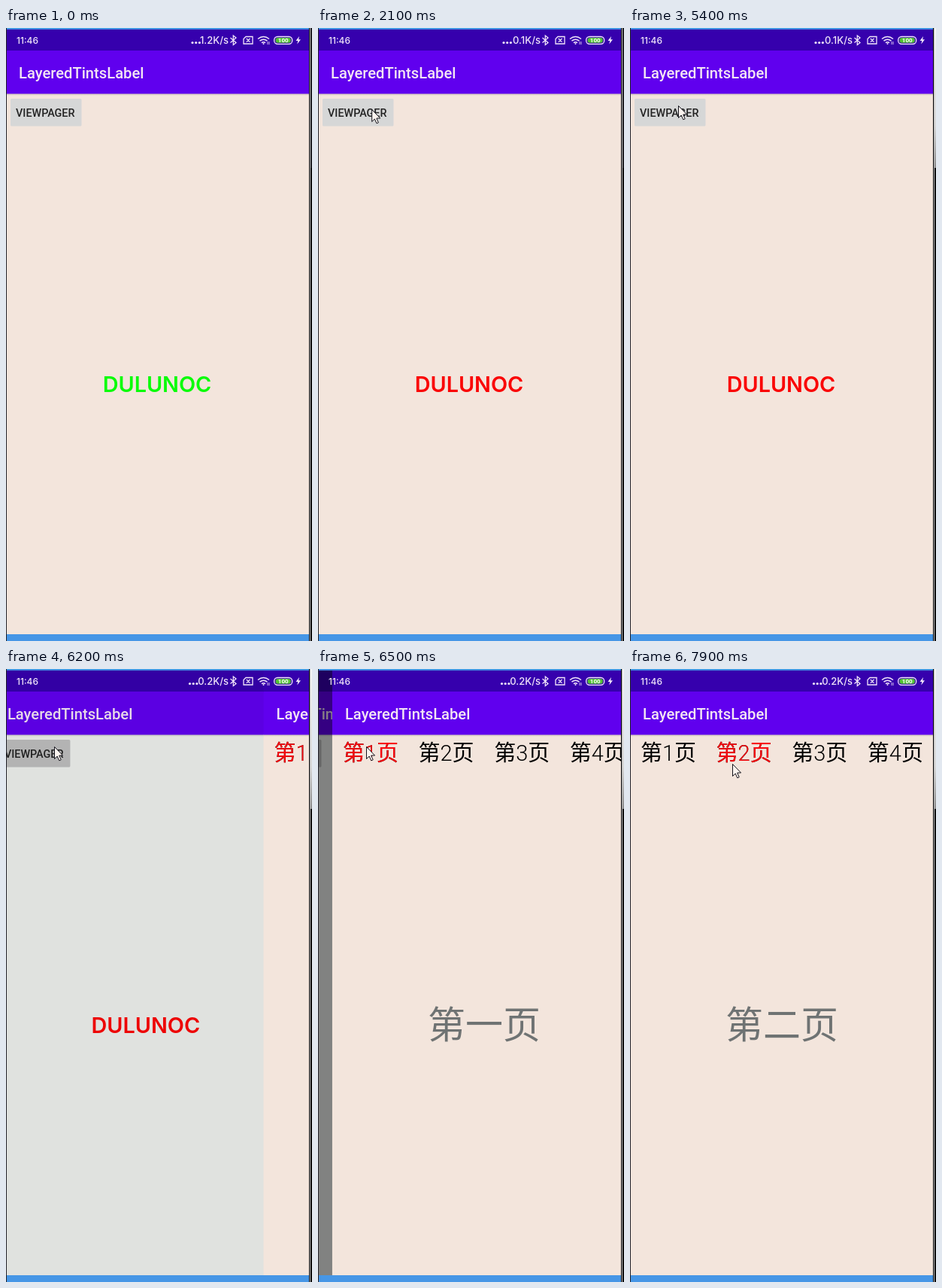
These frames come from a looping animation (407 px wide and 815 px high, 8 s). An HTML page:

```html
<!DOCTYPE html>
<html lang="zh-CN">
<head>
<meta charset="utf-8">
<style>
  html, body { margin: 0; width: 100%; height: 100%; overflow: hidden; background: #000; }
  svg { display: block; width: 100vw; height: 100vh; }
  text { white-space: pre; }
  .title { font: 500 20.2px Roboto, sans-serif; fill: #f3e5f4; }
  .button { font: 500 14.4px Roboto, sans-serif; fill: #222; }
  .status { font: 500 12px Inter, sans-serif; fill: #f1e6fa; }
  #speed { font-size: 13px; }
  .word { font: 600 28.8px Inter, sans-serif; text-anchor: middle; }
  .tab { font: 300 29px Roboto, 'Noto Sans CJK SC', 'Noto Sans CJK', sans-serif; }
  .page { font: 300 50px 'Noto Sans CJK SC', 'Noto Sans CJK', sans-serif; fill: #6f7373; text-anchor: middle; }
</style>
</head>
<body>
<svg viewBox="0 0 407 815" preserveAspectRatio="none">
  <defs>
    <linearGradient id="edge" x1="0" y1="0" x2="0" y2="1">
      <stop offset="0" stop-color="#f4f4f4"/><stop offset=".7" stop-color="#d8d8d8"/><stop offset="1" stop-color="#8c8c8c"/>
    </linearGradient>
    <linearGradient id="shade" x1="0" y1="0" x2="0" y2="1">
      <stop offset="0" stop-color="#000" stop-opacity=".15"/><stop offset="1" stop-color="#000" stop-opacity="0"/>
    </linearGradient>
    <clipPath id="swept"><rect id="sweptBox" x="126" y="450" height="50"/></clipPath>
    <clipPath id="unswept"><rect id="unsweptBox" y="450" width="150" height="50"/></clipPath>
    <clipPath id="tabWindow"><rect id="tabBox" y="88" width="100.5" height="50"/></clipPath>
    <g id="bars">
      <rect y="2" width="404" height="28.5" fill="#3600ad"/>
      <rect y="30" width="404" height="57.5" fill="#6000ee"/>
      <rect y="87.5" width="404" height="2.5" fill="url(#shade)"/>
      <text class="title" x="17" y="67">LayeredTintsLabel</text>
    </g>
  </defs>

  <g id="home">
    <rect id="homeBody" y="87" width="504" height="720"/>
    <use href="#bars"/>
    <rect id="button" x="6" y="94" width="94.5" height="36.5" rx="1.5"/>
    <text class="button" x="13" y="118">VIEWPAGER</text>
    <g class="word">
      <text x="201" y="483.5" fill="#08fc08" clip-path="url(#unswept)">DULUNOC</text>
      <text x="201" y="483.5" fill="#fa0404" clip-path="url(#swept)">DULUNOC</text>
    </g>
  </g>
  <rect id="dim" width="404" height="807"/>

  <g id="pager">
    <rect y="87" width="404" height="720" fill="#f3e5dc"/>
    <use href="#bars"/>
    <g id="tabs" class="tab"></g>
    <g id="tabsRed" class="tab" fill="#f80a10" clip-path="url(#tabWindow)"></g>
    <g id="pages">
      <text class="page" x="202" y="491">第一页</text>
      <text class="page" x="605" y="491">第二页</text>
    </g>
  </g>

  <g fill="none" stroke="#f1e6fa" stroke-width="1.3">
    <text class="status" x="14" y="21" stroke="none">11:46</text>
    <text id="speed" class="status" x="296" y="21" text-anchor="end" stroke="none"></text>
    <g id="dots" fill="#f1e6fa" stroke="none">
      <circle cx="0" cy="19.5" r="1.6"/><circle cx="4.7" cy="19.5" r="1.6"/><circle cx="9.4" cy="19.5" r="1.6"/>
    </g>
    <path d="M298.5 13L306 19.5L302.3 22.5V10L306 13L298.5 19.5"/>
    <path d="M319 11.5H328V21H316V14.5ZM319.8 14L324.6 18.6M324.6 14L319.8 18.6"/>
    <path d="M335 14.5Q342.5 8.5 350 14.5M337.5 17.2Q342.5 13.2 347.5 17.2M340 19.7Q342.5 17.7 345 19.7" stroke-width="1.6"/>
    <circle cx="342.5" cy="21" r="1" fill="#f1e6fa" stroke="none"/>
    <path d="M348 18V22M350 18V22" stroke-width=".8"/>
    <rect x="356.7" y="11.5" width="24" height="9.8" rx="4.5"/>
    <rect x="358.5" y="13" width="20.4" height="6.8" rx="3.2" fill="#52c234" stroke="none"/>
    <text x="368.7" y="19.3" text-anchor="middle" fill="#fff" stroke="none" font-family="Roboto, sans-serif" font-weight="700" font-size="8">100</text>
    <path d="M390 11L385.5 17H388.3L387.3 21.5L392 15.3H389.2Z" fill="#f1e6fa" stroke="none"/>
  </g>

  <path id="cursor" d="M.5.5V16.5L4.2 13L6.8 18.8L9.2 17.8L6.7 12H11.6Z" fill="#fbf4ef" stroke="#14141c" stroke-width="1"/>

  <rect width="404" height="2" fill="#4292e2"/>
  <rect y="806" width="404" height="9" fill="#4696e6"/>
  <rect width="1" height="815" fill="#23232b"/>
  <rect x="403" width="4" height="815" fill="#0a0a0c"/>
  <rect x="404" width="1" height="815" fill="#b8b8b8"/>
  <rect id="edgeTop" x="405" width="2" height="186"/>
</svg>
<script>
const LOOP = 8000, STEP = 100, WIDTH = 403;
const $ = id => document.getElementById(id);
const set = (id, attrs) => { for (const k in attrs) $(id).setAttribute(k, attrs[k]); };
const clamp = v => Math.min(1, Math.max(0, v));
const span = (t, a, b) => clamp((t - a) / (b - a));
const smooth = p => (1 - Math.cos(Math.PI * p)) / 2;

// Keys are [time, ...values]; values blend between neighbours.
function track(keys, t, ease = p => p) {
  let i = 0;
  while (i < keys.length - 2 && t >= keys[i + 1][0]) i++;
  const a = keys[i], b = keys[i + 1], p = ease(span(t, a[0], b[0]));
  return a.slice(1).map((v, k) => v + (b[k + 1] - v) * p);
}

const POINTER = [
  [800, 200, 330], [1500, 60, 105], [1700, 71, 108], [3100, 72, 108],
  [3500, 169, 215], [4500, 169, 215], [5400, 64, 103],
  [6800, 64, 103], [7300, 136, 126]
];
const SLIDE = [[6100, 0], [6200, .15], [6300, .475], [6400, .78], [6500, .953], [6600, .99], [6700, 1]];

for (const id of ['tabs', 'tabsRed'])
  $(id).innerHTML = [1, 2, 3, 4]
    .map((n, i) => `<text x="${14 + 100.6 * i}" y="122">第${n}页</text>`).join('');

function draw(t) {
  // Home word turns from green to red
  const swept = 150 * smooth(span(t, 700, 2000));
  set('sweptBox', { width: swept });
  set('unsweptBox', { x: 126 + swept });

  // Pager slides in over the dimmed home screen
  const [open] = track(SLIDE, t);
  const sliding = open > 0;
  set('home', { transform: `translate(${-open * WIDTH / 4})` });
  set('homeBody', { fill: sliding ? '#eceeeb' : '#f3e5dc' });
  set('button', { fill: t >= 6000 ? '#bdbdbd' : '#d6d7d7' });
  set('dim', { opacity: Math.pow(open, 1.2) * .48 });
  set('pager', {
    transform: `translate(${(1 - open) * WIDTH})`,
    visibility: sliding ? 'visible' : 'hidden'
  });

  // Second tab selected
  const scroll = 1 - Math.pow(1 - span(t, 7400, 7900), 5);
  set('pages', { transform: `translate(${-scroll * WIDTH})` });
  set('tabBox', { x: 13.5 + 76 * scroll });

  // Status bar
  const [speed, dotX] = t < 1300 ? ['1.2', 248] : t < 5800 ? ['0.1', 247] : ['0.2', 244.5];
  $('speed').textContent = speed + 'K/s';
  set('dots', { transform: `translate(${dotX})` });
  set('edgeTop', { fill: t < 2600 ? '#222226' : 'url(#edge)' });

  const [x, y] = track(POINTER, t, smooth);
  set('cursor', {
    transform: `translate(${x} ${y})`,
    visibility: t >= 800 ? 'visible' : 'hidden'
  });
}

const start = performance.now();
function tick() {
  const t = (performance.now() - start) % LOOP;
  draw(Math.floor(t / STEP) * STEP);
  requestAnimationFrame(tick);
}
tick();
</script>
</body>
</html>
```
